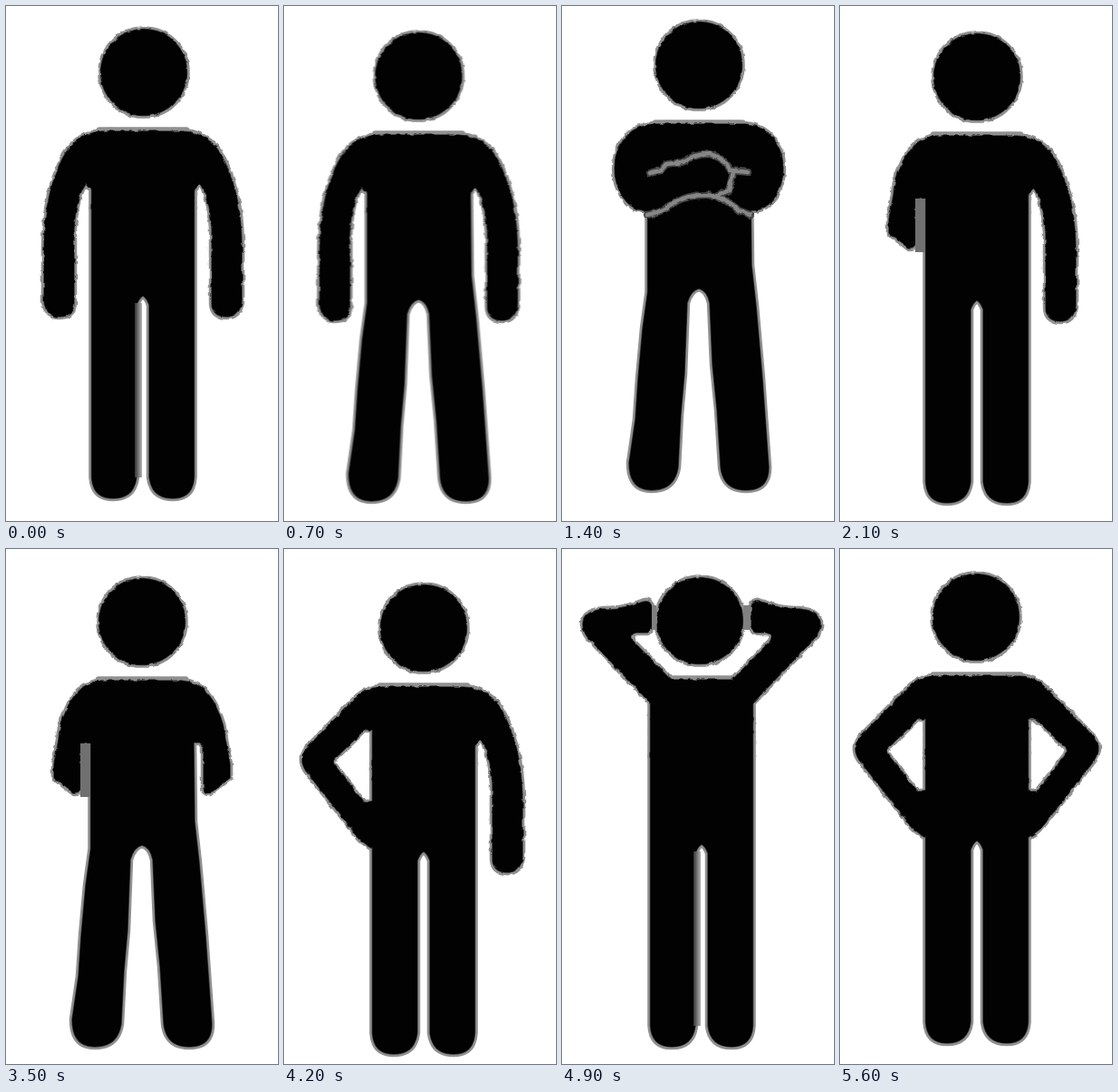
Write an HTML page that moves like this. It is 300x567 px and loops after 6300 ms.

```html
<!DOCTYPE html>
<html lang="en">
<head>
<meta charset="utf-8">
<title>Standing poses</title>
<style>
  html, body { margin: 0; width: 100%; height: 100%; overflow: hidden; background: #fff; }
  svg { display: block; width: 100%; height: 100%; }
  .halo { fill: #909090; stroke: #909090; stroke-width: 6.5; stroke-linejoin: round; }
  .ink { fill: #020202; stroke: #3a3a3a; stroke-width: 1.5; }
  .core { fill: #020202; }
  .crease { fill: none; stroke: #444; stroke-width: 8; stroke-linejoin: round; stroke-linecap: round; }
  .crease.light { stroke: #868686; stroke-width: 4.5; }
  path { fill-rule: evenodd; }
</style>
</head>
<body>
<svg id="stage" viewBox="0 0 300 567">
  <defs>
    <filter id="rough" filterUnits="userSpaceOnUse" x="-165" y="-90" width="330" height="570" color-interpolation-filters="sRGB">
      <feTurbulence type="fractalNoise" baseFrequency=".13" numOctaves="2" seed="4"/>
      <feDisplacementMap in="SourceGraphic" scale="4" xChannelSelector="R" yChannelSelector="G"/>
    </filter>
    <linearGradient id="fade">
      <stop offset="0" stop-color="#333"/>
      <stop offset="1" stop-color="#b4b4b4"/>
    </linearGradient>
  </defs>
</svg>
<script>
const STEP = 700;

// All shapes are relative to the body axis (x) and the head centre (y).
const LEGS = {
  together: 'M-56.5 90V446Q-55 469-33 469Q-10 469-7 446V256Q-4 248 0 246Q4 248 7 256V446Q10 469 33 469Q55 469 56.5 446V90Z',
  apart: 'M-56.5 90V250L-62 290-67 345-70 390-77 438Q-77 468-52 468Q-27 468-23 443L-20 385-16 340-13 262Q-9 248 0 246Q9 248 12 262L15 330 20 380 24 443Q27 468 52 468Q77 468 77 443L70 345 63 265 58 220 56.5 90Z'
};

// Left arms; the right ones are mirrored.
const ARMS = {
  down: 'M0 65H-45Q-80 68-93 105Q-109 140-109 195V252Q-107 269-92 269Q-77 269-76 255V172Q-74 138-63 122L-56 130V150H0Z',
  behind: 'M0 65H-45Q-72 69-83 97Q-91 113-92 130L-97 157V172L-75 189Q-68 190-68 182V138L-63 133H0Z',
  hip: 'M0 65H-48Q-65 66-78 80L-130 133Q-138 144-130 157L-78 223Q-70 235-57 242H0ZM-56 112V192H-66L-99 150Q-101 146-97 143L-65 112Z',
  nape: 'M0 65H-34L-76 22Q-80 14-72 13H-60Q-55 12-55 5V-16Q-57-25-66-21Q-88-12-108-13Q-132-10-131 5Q-130 14-124 20L-56 91V150H0Z',
  crossed: 'M0 65H-50Q-80 67-91 98Q-97 125-84 145Q-73 161-57 160H0Z'
};

const CREASES = 'M-57 165Q-40 162-28 152Q-14 143 10 143Q30 146 44 160L57 165' +
  'M-54 119L-42 116-36 109-18 107Q-6 98 12 98Q28 102 35 116L54 118M38 118L33 138 16 145';

const path = (d, attrs = '') => `<path d="${d}" ${attrs}/>`;
const rect = (x, y, w, h, fill) =>
  `<rect x="${x}" y="${y}" width="${w}" height="${h}" ${fill ? `fill="${fill}"` : ''}/>`;

const crease = '<g filter="url(#rough)">' +
  path(CREASES, 'class="crease"') + path(CREASES, 'class="crease light"') + '</g>';
const sleeve = rect(-68, 134, 11, 59, '#707070');
const inseam = rect(-9, 254, 8, 192, 'url(#fade)');
const hands = rect(-55, -17, 5.5, 27, '#808080') + rect(46, -17, 8, 27, '#808080');
const collar = rect(-48, 63.5, 96, 6);

const POSES = [
  { x: 151, y: 73, headX: 1, left: 'down', right: 'down', legs: 'together', extra: inseam },
  { x: 148.5, y: 77, left: 'down', right: 'down', legs: 'apart' },
  { x: 151, y: 65, left: 'crossed', right: 'crossed', legs: 'apart', extra: crease },
  { x: 151, y: 78, left: 'behind', right: 'down', legs: 'together', extra: sleeve },
  { x: 147, y: 73.5, left: 'behind', right: 'behind', legs: 'together', extra: sleeve },
  { x: 150, y: 80, left: 'behind', right: 'behind', legs: 'apart', extra: sleeve },
  { x: 154, y: 87, left: 'hip', right: 'down', legs: 'together' },
  { x: 154, y: 79, headX: -2, left: 'nape', right: 'nape', legs: 'together', extra: inseam + hands },
  { x: 151, y: 75, headX: -1, left: 'hip', right: 'hip', legs: 'together' }
];

function figure({ x, y, headX = 0, left, right, legs, extra = '' }) {
  const parts = path(LEGS[legs]) +
    `<g filter="url(#rough)"><circle cx="${headX}" r="47.5"/>` +
    path(ARMS[left]) + path(ARMS[right], 'transform="scale(-1 1)"') + '</g>';
  return `<g class="pose" transform="translate(${x} ${y})">` +
    `<g class="halo">${collar}${parts}</g><g class="ink">${parts}</g>` +
    `<g class="core">${parts}</g>${extra}</g>`;
}

const stage = document.getElementById('stage');
stage.insertAdjacentHTML('beforeend', POSES.map(figure).join(''));

const count = POSES.length;
const duration = STEP * count;
stage.querySelectorAll('.pose').forEach((pose, i) => {
  pose.animate([
    { opacity: 1, offset: 0, easing: 'step-end' },
    { opacity: 0, offset: 1 / count, easing: 'step-end' },
    { opacity: 0, offset: 1 }
  ], { duration, iterations: Infinity, delay: i * STEP - duration });
});
</script>
</body>
</html>
```
